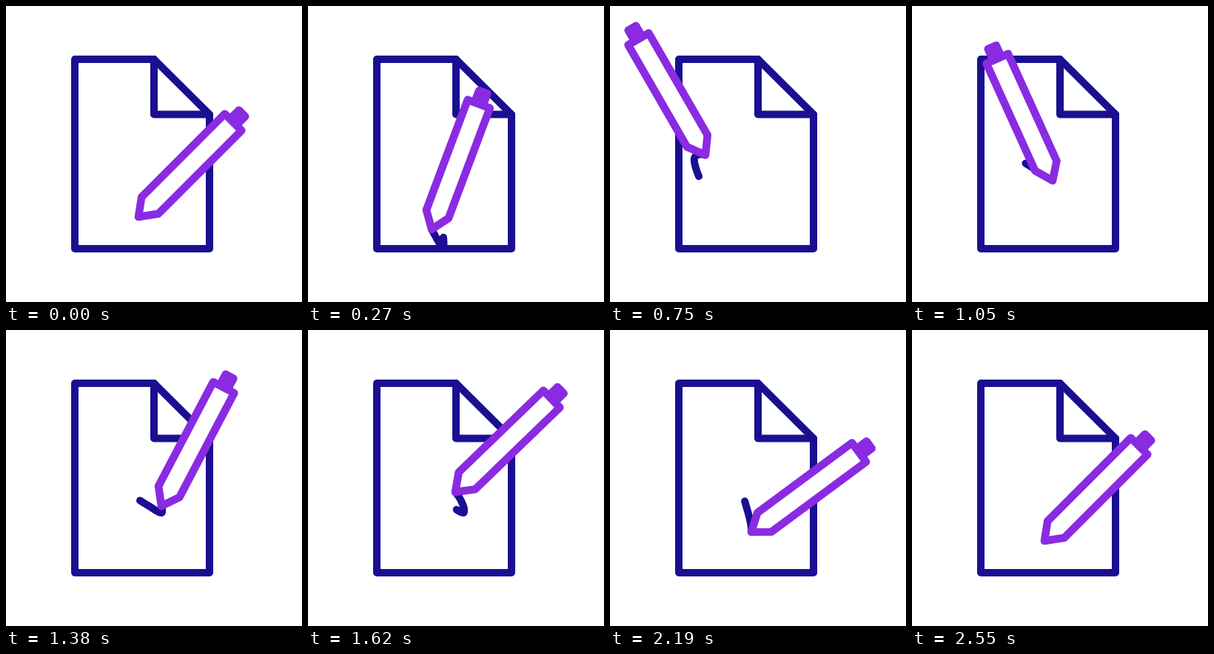
Write an HTML page with a canvas that moves like this. It is 400 px wide and 400 px high and loops after 4610 ms.

```html
<!DOCTYPE html>
<html lang="en">
<head>
<meta charset="utf-8">
<title>Pen writing on a page</title>
<style>
html, body { margin: 0; height: 100%; overflow: hidden; background: #fff; }
canvas { display: block; }
</style>
</head>
<body>
<canvas id="stage" width="400" height="400"></canvas>
<script>
const ctx = document.getElementById('stage').getContext('2d');
const NAVY = '#1a0f91', PURPLE = '#8a2be2';
const LOOP = 4610, STEP = 30, END = 2550, TRAIL = 42;

// Turning points of the pen: time, tip x, tip y, lean in degrees
const keys = [
  [0, 179, 285, 45], [180, 182, 326, 31], [330, 154, 279, 13],
  [450, 127, 245, -2], [600, 114, 206, -21], [800, 137, 204, -31],
  [1050, 190, 236, -24.4], [1290, 210, 247, 13], [1380, 210, 238, 27.7],
  [1620, 199, 219, 46], [1840, 173, 194, 60], [1890, 176.5, 210.5, 60.5],
  [2190, 191, 273, 53.5], [2400, 171, 281, 48], [END, 179, 285, 45]
];

function slope(i, c) {
  const a = keys[i - 1], b = keys[i + 1];
  return a && b ? (b[c] - a[c]) / (b[0] - a[0]) : 0;
}

// Smooth Hermite curve through the keys
function pose(t) {
  let i = 0;
  while (i < keys.length - 2 && keys[i + 1][0] <= t) i++;
  const a = keys[i], b = keys[i + 1], d = b[0] - a[0];
  const u = (t - a[0]) / d, v = 1 - u;
  return [1, 2, 3].map(c =>
    v * v * (1 + 2 * u) * a[c] + u * u * (3 - 2 * u) * b[c] +
    d * u * v * (v * slope(i, c) - u * slope(i + 1, c)));
}

function shape(points, color, fill, closed = true) {
  ctx.beginPath();
  points.forEach(([x, y]) => ctx.lineTo(x, y));
  if (closed) ctx.closePath();
  if (fill) {
    ctx.fillStyle = fill;
    ctx.fill();
  }
  ctx.strokeStyle = color;
  ctx.stroke();
}

function drawPage() {
  ctx.lineWidth = 10;
  shape([[93, 72], [200, 72], [275, 146.5], [275, 328], [93, 328]], NAVY);
  shape([[200, 72], [200, 146.5], [275, 146.5]], NAVY, null, false);
}

// Ink follows the tip and runs out as the pen settles
function drawTrail(t) {
  let left = TRAIL * Math.min(1, (END - t) / 300);
  if (t <= 0 || left <= 0) return;
  let p = pose(t);
  const points = [p];
  for (let s = t - 5; s >= 0 && left > 0; s -= 5) {
    const q = pose(s);
    left -= Math.hypot(q[0] - p[0], q[1] - p[1]);
    points.push(p = q);
  }
  shape(points, NAVY, null, false);
}

function drawPen([x, y, lean]) {
  ctx.lineWidth = 10.6;
  ctx.save();
  ctx.translate(x, y);
  ctx.rotate(lean * Math.PI / 180);
  shape([[-6, -181], [-6, -198], [6, -198], [6, -181]], PURPLE, PURPLE);
  shape([[0, 0], [-16, -22], [-16, -181], [16, -181], [16, -22]], PURPLE, '#fff');
  ctx.restore();
}

function frame(now) {
  const t = Math.min(Math.floor((now - start) % LOOP / STEP) * STEP, END);
  ctx.clearRect(0, 0, 400, 400);
  drawPage();
  drawTrail(t);
  drawPen(pose(t));
  requestAnimationFrame(frame);
}

ctx.lineJoin = ctx.lineCap = 'round';
const start = document.timeline.currentTime || 0;
frame(start);
</script>
</body>
</html>
```
